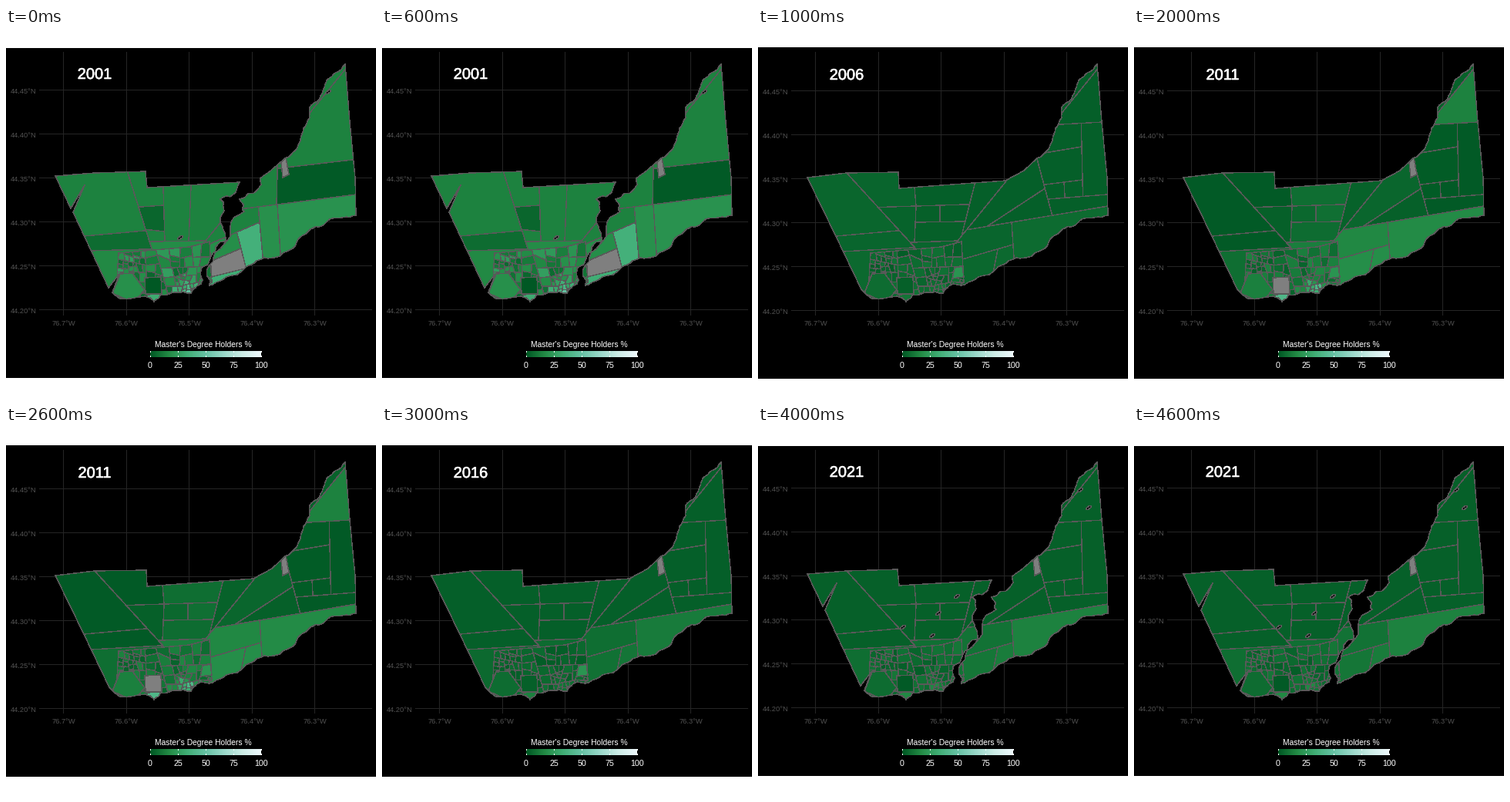
These frames come from a looping animation (480 px wide and 480 px high, 5 s). A matplotlib script:

```python
import numpy as np
import matplotlib.pyplot as plt
from matplotlib.animation import ArtistAnimation
from matplotlib.colors import LinearSegmentedColormap
from matplotlib.patches import Ellipse, PathPatch, Polygon, Rectangle
from matplotlib.path import Path
from matplotlib.patheffects import withStroke

SIZE, DPI = 480, 80
PX = 72 / DPI
YEARS = range(2001, 2022, 5)
MISSING = "#7f7f7f"
THIN = dict(ec="#595959", lw=0.4 * PX, aa=False)
GREENS = LinearSegmentedColormap.from_list("greens", [
    "#005824", "#238b45", "#41ae76", "#66c2a4", "#99d8c9", "#ccece6", "#edf8fb"])

plt.rcParams["font.family"] = "Liberation Sans"
fig = plt.figure(figsize=(SIZE / DPI, SIZE / DPI), dpi=DPI, facecolor="white")
ax = fig.add_axes([0, 0, 1, 1])


def coast(seed, rough, *p):
    """Shoreline through key points, roughened by midpoint displacement."""
    rng = np.random.default_rng(seed)
    p = np.array(p, float)
    for _ in range(3):
        step = np.diff(p, axis=0)
        side = step[:, ::-1] * (1, -1) * rng.uniform(-rough, rough, (len(step), 1))
        out = np.empty((2 * len(p) - 1, 2))
        out[::2], out[1::2] = p, (p[1:] + p[:-1]) / 2 + side
        p = out
    return p


def ring(*parts):
    p = np.vstack(parts)
    return Path(np.vstack([p, p[:1]]), closed=True)


# Outlines: with the lakes filled in, and cropped at the shore
north_shore = coast(3, 0.1, (362, 169), (374, 160), (382, 145), (394, 116),
                    (394, 103), (410, 85), (416, 68), (440, 47))
east_edge = [(440, 47), (446, 122), (453, 195), (454, 243)]
south_shore = coast(1, 0.12, (454, 243), (420, 248), (395, 261), (372, 286),
                    (335, 298), (300, 320), (264, 334))
city_shore = coast(2, 0.14, (253, 332), (240, 344), (201, 346), (192, 355),
                   (181, 348), (150, 351), (138, 343))

filled = ring([(64, 194), (115, 188), (182, 187), (183, 208), (321, 198), (345, 185)],
              north_shore, east_edge, south_shore, city_shore, [(134, 339), (101, 270)])
west = ring([(64, 192), (115, 188), (181, 186), (183, 207)],
            coast(4, 0.22, (303, 200), (278, 222), (282, 262), (266, 296), (253, 332)),
            city_shore,
            [(147, 319), (133, 337), (87, 239), (102, 204), (84, 234)])
east = ring(coast(5, 0.22, (341, 187), (303, 222), (309, 238), (272, 284), (264, 334)),
            south_shore[::-1], east_edge[::-1], north_shore[::-1])
cropped = Path.make_compound_path(west, east)

LAKES = [(226, 272), (418, 83), (188, 261), (258, 221), (234, 243), (429, 106)]


def cut(p, c, n):
    """Divide a convex shape by the line through c with normal n."""
    d = (p - c) @ n
    a, b = [], []
    for i in range(len(p)):
        j = (i + 1) % len(p)
        (a if d[i] >= 0 else b).append(p[i])
        if d[i] * d[j] < 0:
            q = p[i] + (p[j] - p[i]) * d[i] / (d[i] - d[j])
            a.append(q)
            b.append(q)
    return [np.array(h) for h in (a, b) if len(h) > 2]


def divide(*borders):
    """Each border x1, y1, x2, y2 cuts the area its midpoint lies in."""
    cells = [np.array([(60, 40), (460, 40), (460, 360), (60, 360)], float)]
    for x1, y1, x2, y2 in borders:
        mid = (x1 + x2) / 2, (y1 + y2) / 2
        i = next(i for i, c in enumerate(cells) if Path(c).contains_point(mid))
        cells += cut(cells.pop(i), mid, np.array([y2 - y1, x1 - x2]))
    return cells


early = divide(
    (325, 195, 268, 265),
    # western half
    (158, 188, 182, 264), (101, 270, 180, 263), (109, 289, 180, 287),
    (190, 277, 260, 276), (240, 206, 237, 276), (204, 208, 206, 276),
    (176, 232, 204, 230), (178, 261, 206, 264),
    # eastern half
    (351, 229, 454, 216), (352, 188, 351, 229), (363, 181, 449, 171),
    (352, 229, 356, 292), (329, 252, 333, 296), (283, 272, 329, 252),
    (299, 263, 309, 302), (272, 300, 300, 288), (270, 322, 302, 314))
late = divide(
    (325, 195, 268, 265),
    # western half
    (115, 188, 190, 270), (101, 270, 181, 263), (110, 290, 182, 286),
    (201, 278, 260, 276), (281, 203, 265, 266), (142, 233, 268, 229),
    (203, 206, 205, 231), (205, 232, 203, 278), (205, 252, 268, 251),
    (236, 230, 236, 252),
    # eastern half
    (329, 252, 454, 231), (362, 170, 376, 222), (290, 262, 374, 207),
    (376, 222, 453, 216), (393, 125, 447, 122), (420, 155, 421, 197),
    (384, 160, 420, 154), (397, 200, 421, 197), (397, 200, 398, 218),
    (329, 252, 332, 297), (272, 298, 310, 287), (311, 288, 305, 318))

# Areas that stand out from the general trend: a point inside and the value
OUTLIERS = {2001: [((190, 247), 5), ((140, 278), 7), ((400, 200), 1),
                   ((318, 280), 35), ((290, 324), 33), ((287, 305), None)],
            2011: [((425, 90), 14)]}


def trend(k, x, y):
    south = np.clip((y + 0.2 * (x - 200) - 280) / 20, 0, 1)
    value = (14, 2.5, 1, 2.5, 3)[k] + south * (6, 4, 16, 9, 11)[k] * x / 400
    if k == 1:
        value += 4 * max(0, 1 - x / 260)
    if k == 2:
        value += 7 * np.exp(-((x - 270) / 70) ** 2)
    return value


def areas(k):
    for p in late if k else early:
        value = trend(k, *p.mean(0))
        for spot, special in OUTLIERS.get(YEARS[k], []):
            if Path(p).contains_point(spot):
                value = special
        yield value, p


def blocks(p, rng):
    """Split a district into city blocks, finer near the two centres."""
    c, ext = p.mean(0), np.ptp(p, axis=0)
    far = min(np.hypot(*(c - q)) for q in ((160, 305), (234, 332)))
    if ext.max() < 6 + far * 0.25 + rng.uniform(0, 6):
        return [p]
    turn = rng.normal(0, 0.2) + (0 if ext[0] > ext[1] else np.pi / 2)
    c = c + rng.uniform(-0.15, 0.15, 2) * ext
    halves = cut(p, c, np.array([np.cos(turn), np.sin(turn)]))
    return [q for h in halves for q in blocks(h, rng)]


town = blocks(np.array([(146, 292), (238, 284), (264, 277), (267, 330),
                        (240, 349), (180, 352), (143, 342)], float),
              np.random.default_rng(8))

# Larger city districts with one value per year
DISTRICTS = [((0, 3, None, 3, 1), [(180, 324), (201, 323), (202, 345), (181, 345)]),
             ((32, 9, 40, 13, 16), [(183, 346), (199, 345), (204, 350), (186, 360)]),
             ((19, 7, 13, 7, 7), [(138, 344), (148, 319), (164, 318), (180, 340), (165, 356)]),
             ((9, 21, 21, 21, 9), [(255, 311), (265, 309), (267, 323), (252, 325)])]
SLAB = [(357, 174), (363, 168), (367, 190), (359, 194)]


def town_values(k):
    rng = np.random.default_rng(20 + k)
    mean, glow = (15, 5, 9, 4, 6)[k], (38, 4, 32, 5, 9)[k]
    for p in town:
        x, y = p.mean(0) - (238, 338)
        near = np.exp(-(x * x / 320 + y * y / 110))
        yield mean * rng.uniform(0.3, 1.7) + glow * near * rng.uniform(0.4, 1.2), p


def shapes(k):
    yield from areas(k)
    yield from town_values(k)
    for values, p in DISTRICTS:
        yield values[k], p
    if k != 1:
        yield None, SLAB


def paint(value):
    return MISSING if value is None else GREENS(value / 100)


def label(x, y, s, px, color="white", ha="center", **kw):
    return ax.text(x, y, s, fontsize=px * PX, color=color, ha=ha, va="baseline",
                   zorder=9, **kw)


def bar(x, y, w, h, color, z):
    return ax.add_patch(Rectangle((x, y), w, h, fc=color, ec="none", aa=False, zorder=z))


def scene(k):
    at_shore = k in (0, 4)
    up = int(at_shore)
    land = cropped if at_shore else filled
    out = [bar(0, 25 + up, SIZE, 430 - 2 * up, "black", 0)]
    for i in range(6):
        y = 81 + 57 * i - up
        out += [bar(43, y, 432, 1, "#252525", 1),
                label(39.5, y + 5, f"44.{45 - 5 * i}°N", 9.4, "#525252", "right")]
    for value, p in shapes(k):
        patch = ax.add_patch(Polygon(p, fc=paint(value), zorder=3, **THIN))
        patch.set_clip_path(land, transform=ax.transData)
        out.append(patch)
    for c in LAKES[:{0: 2, 4: 6}.get(k, 0)]:
        out.append(ax.add_patch(Ellipse(c, 8, 3, angle=-35, fc="black", zorder=4, **THIN)))
    out.append(ax.add_patch(PathPatch(land, fc="none", zorder=5, **THIN)))
    out.append(label(115, 67 - up, str(YEARS[k]), 20,
                     path_effects=[withStroke(linewidth=0.6 * PX, foreground="white")]))
    return out


# Parts that never change: meridians and the colour key
for i in range(5):
    x = 74 + 81.6 * i
    bar(round(x), 31, 1, 342, "#252525", 1)
    label(x + 0.5, 386, f"76.{7 - i}°W", 9.4, "#525252")
label(255.5, 413.5, "Master's Degree Holders %", 10.3)
ax.imshow(np.linspace(0, 1, 144)[None], cmap=GREENS, extent=(187, 331, 427, 419),
          aspect="auto", interpolation="nearest", zorder=6)
for i in range(5):
    x = 187 + 36 * i
    bar(x, 419, 1, 2, "white", 7)
    bar(x, 425, 1, 2, "white", 7)
    label(x, 441, str(25 * i), 10.6)

ax.set_xlim(0, SIZE)
ax.set_ylim(SIZE, 0)
ax.axis("off")

anim = ArtistAnimation(fig, [scene(k) for k in range(5)], interval=1000,
                       repeat=True, repeat_delay=0, blit=False)
plt.show()
```
